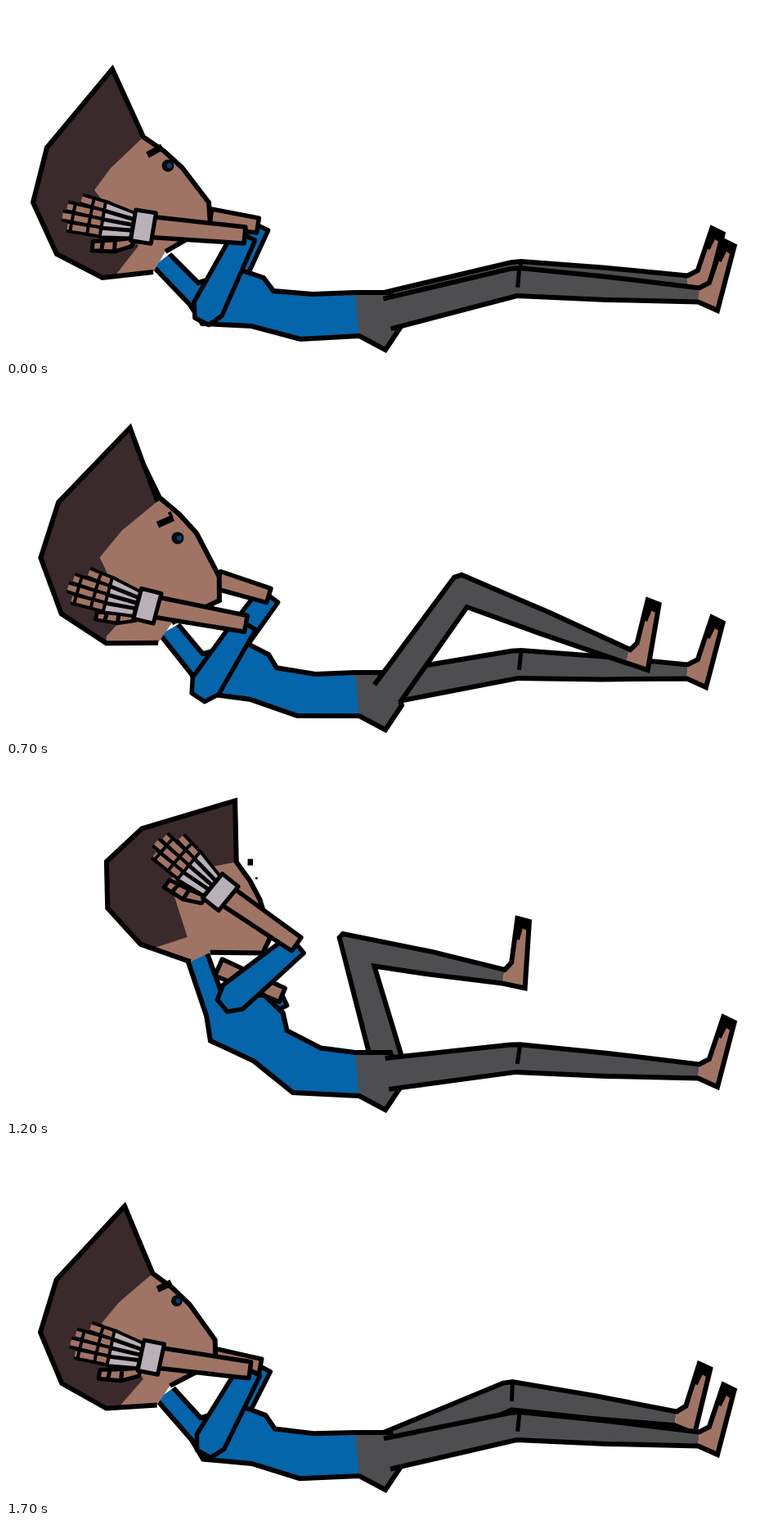
Write an HTML page that moves like this. It is 944 by 430 pixels and loops after 1.8 s.

```html
<!DOCTYPE html>
<html lang="en">
<head>
<meta charset="utf-8">
<title>Bicycle crunch</title>
<style>
html, body { margin: 0; width: 100%; height: 100%; overflow: hidden; background: #fff; }
svg { display: block; width: 100vw; height: 100vh; }
</style>
</head>
<body>
<svg id="stage" viewBox="0 0 944 430"></svg>
<script>
const LOOP = 1800, STEP = 100;
const SKIN = '#a07464', HAIR = '#3a2a2c', BLUE = '#0565aa', GREY = '#4e4d50', GLOVE = '#b9b1b8', INK = '#000';
const stage = document.getElementById('stage');

// Vector helpers
const plus = (p, q, k = 1) => [p[0] + q[0] * k, p[1] + q[1] * k];
const minus = (p, q) => plus(p, q, -1);
const mix = (p, q, k) => plus(p, minus(q, p), k);
const polar = (deg, r = 1) => [Math.cos(deg * Math.PI / 180) * r, Math.sin(deg * Math.PI / 180) * r];
const unit = v => { const l = Math.hypot(...v); return [v[0] / l, v[1] / l]; };
const normal = d => [d[1], -d[0]];
const cross = (p, q) => p[0] * q[1] - p[1] * q[0];
const points = s => s.split(' ').map(p => p.split(',').map(Number));

// One rise and fall between two moments
const pulse = (t, from, to) => Math.sin(Math.PI * Math.min(1, Math.max(0, (t - from) / (to - from)))) ** 1.5;

// Affine map that carries triangle a onto triangle b
function warp(a, b) {
  const u = minus(a[1], a[0]), v = minus(a[2], a[0]), area = cross(u, v);
  return p => {
    const w = minus(p, a[0]);
    const q = plus(b[0], minus(b[1], b[0]), cross(w, v) / area);
    return plus(q, minus(b[2], b[0]), cross(u, w) / area);
  };
}

// Joints: lying, turned to the viewer, turned away
const JOINTS = {
  tip: points('130,77 210,40 282,42'),
  nape: points('62,303 83,212 125,172'),
  chin: points('250,268 290,246 315,228'),
  neck: points('190,310 225,262 235,232'),
  spine: points('240,388 235,340 250,335'),
  shoulder: points('247,370 237,356 278,281'),
  elbow: points('292,280 297,318 356,217'),
  wrist: points('178,270 196,270 272,158'),
  farShoulder: points('282,322 288,268 305,295'),
  farElbow: points('308,268 357,224 338,280'),
  farWrist: points('250,259 284,178 260,246')
};
const BELLY = [390, 375];
const SKULL = points('180,325 118,332 62,303 33,240 50,173 130,77');
const FACE = points('168,160 193,177 215,197 248,240 250,268 195,300');
const HAIRLINE = points('168,160 128,198 108,225 162,293 133,330');
const CHEST = points('200,303 235,338 285,322 315,332 327,348 375,352');
const PELVIS = points('427,350 470,350 484,390 464,420 432,403');
const BACK = points('360,407 300,391 240,388 225,365 180,318');
const FOOT = points('19,5 73,-2 73,13 -7,29');
const BROW = points('173,182 191,172');
const EYE = [198, 195], TURN = [11, -18];

function add(tag, attrs, parent = stage) {
  const el = document.createElementNS('http://www.w3.org/2000/svg', tag);
  for (const k in attrs) el.setAttribute(k, attrs[k]);
  parent.appendChild(el);
  return el;
}
const fill = color => add('path', { fill: color });
const line = (w = 6) => add('path', {
  fill: 'none', stroke: INK, 'stroke-width': w, 'stroke-linejoin': 'miter', 'stroke-miterlimit': 3
});
const solid = color => add('path', { fill: color, stroke: INK, 'stroke-width': 5.5, 'stroke-linejoin': 'round' });
const draw = (el, pts, close) =>
  el.setAttribute('d', 'M' + pts.map(p => p.map(v => v.toFixed(1)).join(' ')).join('L') + (close ? 'Z' : ''));

const makeLeg = () => ({ leg: fill(GREY), foot: fill(SKIN), edge: line(), toes: line(10), nail: line(5), knee: line(5) });
const makeEye = () => ({ ball: add('circle', { fill: '#0a0d12' }), iris: add('circle', { fill: '#0b3f70' }) });

function makeHand() {
  const g = add('g', { stroke: INK, 'stroke-width': 5, 'stroke-linejoin': 'round' });
  const thumb = add('g', {}, g);
  add('path', { d: 'M8-16L27-22L56-30L55-41L28-37L8-26Z', fill: SKIN }, thumb);
  add('path', { d: 'M28-37L30-22M44-39L44-27' }, thumb);
  for (let i = 0; i < 4; i++) {
    const y = 15 - i * 10.5;
    const d = `M46 ${y}L${99 - 6 * (i - 1.8) ** 2} ${y * 1.15 + 1}`;
    add('path', { d, 'stroke-width': 15 }, g);
    add('path', { d, stroke: SKIN, 'stroke-width': 7, 'stroke-dasharray': '17 4' }, g);
  }
  add('path', { d: 'M12 14L50 21L49-23L12-17Z', fill: GLOVE, 'stroke-width': 4 }, g);
  for (let y = 10; y > -14; y -= 11) add('path', { d: `M10 ${y * .6}L52 ${y}` }, g);
  add('path', { d: 'M12 18L-13 19L-14-19L11-20Z', fill: GLOVE }, g);
  return { g, thumb };
}

// Back to front
const farLeg = makeLeg();
const farUpper = solid(BLUE), farFore = solid(SKIN);
const body = fill(BLUE), pelvis = fill(GREY), bodyEdge = line();
const nearLeg = makeLeg();
const headFill = fill(SKIN), hair = fill(HAIR), hairFront = line(5), headEdge = line();
const farBrow = line(8), farEye = makeEye(), brow = line(8), eye = makeEye();
const upperArm = solid(BLUE), foreArm = solid(SKIN);
const hand = makeHand();

// Tapered bone from p to q, with an optional blunt cap at q
function limb(el, p, q, w0, w1, cap) {
  const d = unit(minus(q, p)), n = normal(d);
  const end = cap ? [plus(plus(q, n, -w1 / 2), d, cap), plus(plus(q, n, w1 / 2), d, cap)] : [];
  draw(el, [plus(p, n, w0), plus(p, n, -w0), plus(q, n, -w1), ...end, plus(q, n, w1)], true);
}

// Thigh swings round the hip while the ankle is pulled in
function drawLeg(part, hip, rest, pull, raise, sag) {
  const drop = [0, sag];
  const knee = plus(plus(hip, polar(-14 - 100 * raise, 162 - 14 * raise)), drop);
  const ankle = plus(plus(rest, pull, raise ** 1.2), drop);
  const thigh = unit(minus(knee, hip)), shin = unit(minus(ankle, knee));
  const n0 = normal(thigh), n1 = normal(shin), bend = unit(plus(n0, n1));
  const reach = Math.min(30, 17 / (bend[0] * n0[0] + bend[1] * n0[1]));
  const corner = plus(knee, bend, reach), mid = mix(knee, ankle, .5);
  const blunt = 6;
  const top = [plus(hip, n0, 19), plus(corner, thigh, -blunt), plus(corner, shin, blunt), plus(mid, n1, 14), plus(ankle, n1, 8.5)];
  const under = [plus(ankle, n1, -8.5), plus(mid, n1, -14), plus(knee, bend, -reach), plus(hip, n0, -19)];
  const aim = polar(-64 - 12 * raise), side = [-aim[1], aim[0]];
  const foot = FOOT.map(([x, y]) => plus(plus(ankle, aim, x), side, y));

  draw(part.leg, [...top, ...under, plus(hip, thigh, -14)], true);
  draw(part.foot, [top[4], ...foot, under[0]], true);
  draw(part.edge, [...top, ...foot, ...under]);
  draw(part.toes, [mix(foot[1], foot[0], .08), mix(foot[2], foot[3], .08)]);
  const toe = mix(foot[1], foot[2], .45);
  draw(part.nail, [toe, plus(toe, aim, -25)]);
  draw(part.knee, [top[2], mix(top[2], under[2], raise > .1 ? 0 : .7)]);
}

function drawEye(part, c, r) {
  [[part.ball, 1, 0], [part.iris, .4, .25]].forEach(([el, size, dx]) => {
    el.setAttribute('cx', c[0] + r * dx);
    el.setAttribute('cy', c[1]);
    el.setAttribute('r', r * size);
  });
}

function drawTorso(j, left) {
  const move = warp([JOINTS.neck[0], JOINTS.spine[0], BELLY], [j.neck, j.spine, BELLY]);
  const chest = CHEST.map(move), back = BACK.map(move);
  chest[2] = plus(chest[2], [-8, -40], left * left);
  const torso = [...chest, ...PELVIS, ...back];
  draw(body, torso, true);
  draw(pelvis, PELVIS, true);
  draw(bodyEdge, torso);
}

function drawHead(j, left, right) {
  const tip = plus(j.tip, [0, -80], left * Math.max(0, 1 - left));
  const move = warp([JOINTS.tip[0], JOINTS.nape[0], JOINTS.chin[0]], [tip, j.nape, j.chin]);
  const skull = SKULL.map(move), face = FACE.map(move), rim = HAIRLINE.map(move);
  // The far side of hair and brow shows when facing the viewer
  const front = face.map((p, i) => i < 3 ? plus(p, TURN, left) : p);
  const head = [...skull, mix(tip, face[0], .5), ...front];
  const scalp = rim.map((p, i) => i > 1 ? mix(p, j.nape, left * (i > 2 ? .8 : .35)) : p);
  draw(headFill, head, true);
  draw(hair, [...skull.slice(1), mix(tip, face[0], .5), front[0], ...scalp], true);
  draw(hairFront, [tip, rim[0]]);
  draw(headEdge, head);

  const shift = right - left, across = [24, -29];
  const pupil = plus(move(EYE), TURN, shift);
  const ridge = BROW.map(p => plus(move(p), TURN, shift));
  const center = mix(ridge[0], ridge[1], .5);
  const shrink = Math.max(0, 1 - right);
  draw(brow, ridge.map(p => mix(center, p, .3 + .7 * shrink)));
  draw(farBrow, ridge.map(p => plus(mix(center, p, .7 * left), across, left)));
  drawEye(eye, pupil, 1.5 + 6 * shrink);
  drawEye(farEye, plus(pupil, across, left), 6 * left * left);
}

function drawHand(j, left) {
  const d = unit(minus(j.wrist, j.elbow)), c = plus(j.wrist, d, 11);
  const angle = Math.atan2(d[1], d[0]) * 180 / Math.PI + 6;
  hand.g.setAttribute('transform', `translate(${c}) rotate(${angle})`);
  hand.thumb.setAttribute('transform', `scale(1 ${1 - .6 * left})`);
}

function render(t) {
  const nearRaise = 1.05 * pulse(t, 0, 850), farRaise = pulse(t, 840, 1760);
  const left = 1.08 * pulse(t, 0, 805), right = 1.08 * farRaise;
  const j = {};
  for (const name in JOINTS) {
    const [rest, a, b] = JOINTS[name];
    j[name] = plus(plus(rest, minus(a, rest), left), minus(b, rest), right);
  }
  const settle = other => 1 - Math.max(0, 1 - other) ** 3;
  drawLeg(farLeg, [468, 368], [833, 338], [-250, -90], farRaise, 14 * settle(nearRaise));
  drawLeg(nearLeg, [466, 376], [847, 353], [-260, -69], nearRaise, 20 * settle(farRaise));
  drawTorso(j, left);
  drawHead(j, left, right);
  limb(farUpper, j.farElbow, j.farShoulder, 14, 15);
  limb(farFore, j.farWrist, j.farElbow, 11, 9);
  limb(upperArm, j.elbow, j.shoulder, 14, 19, 17);
  limb(foreArm, j.wrist, j.elbow, 12.5, 10);
  drawHand(j, left);
}

const start = performance.now();
function tick() {
  const t = (performance.now() - start) % LOOP;
  render(Math.floor(t / STEP) * STEP);
  requestAnimationFrame(tick);
}
tick();
</script>
</body>
</html>
```
